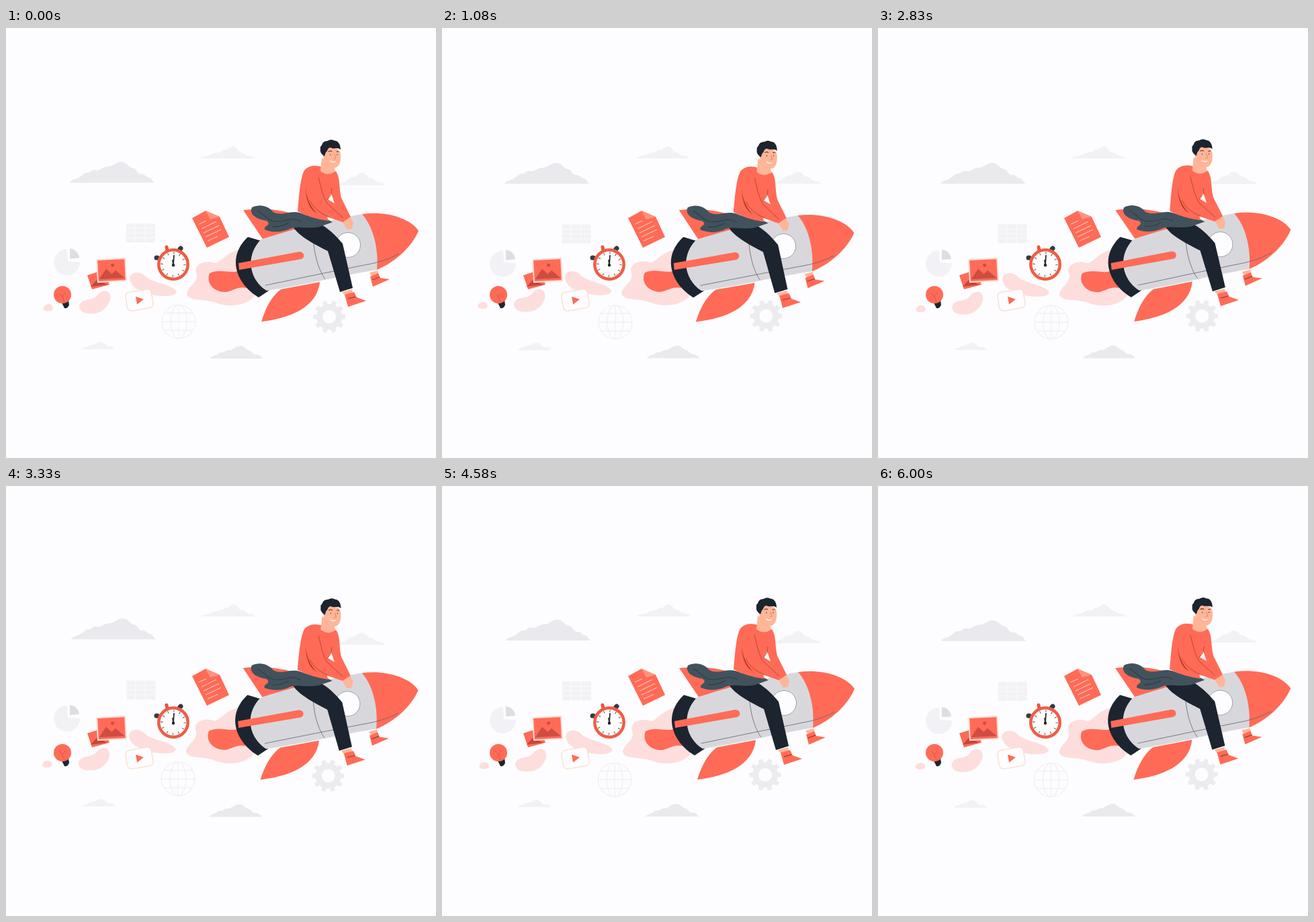
Animation of 640 by 640 pixels, one loop 6.08 s. Source, as an HTML page:

```html
<!DOCTYPE html>
<html lang="en">
<head>
<meta charset="utf-8">
<title>Rocket ride</title>
<style>
  html, body { margin: 0; width: 100%; height: 100%; overflow: hidden; background: #fdfdff; }
  svg { display: block; width: 100vw; height: 100vh; }
  .red { fill: #ff6b57; }
  .dark { fill: #1c2430; }
  .skin { fill: #ffb598; }
  .flame { fill: #fddedd; }
  .cloud { fill: #e9e9ee; }
  .pale { fill: #f2f2f6; }
  .line { fill: none; stroke: #62656d; stroke-width: .8; }
  .seam { fill: none; stroke: #b5432f; stroke-width: .9; }
  .thin { fill: none; stroke: #f0f0f4; stroke-width: 1.2; }
</style>
</head>
<body>
<svg viewBox="0 0 640 640">
  <!-- drifting background -->
  <g data-drift="4 -4"><path class="cloud" d="M95 230C98 224 104 226 109 222C115 219 115 215 121 215C126 216 126 210 133 211C139 213 143 207 151 206C158 207 162 200 171 199C181 199 182 207 188 208C195 208 194 217 201 217C207 216 208 222 213 222C217 223 217 226 221 230Z"/></g>
  <g data-drift="3 0"><path class="pale" d="M290 194C295 189 300 192 306 188C314 184 319 187 324 181C330 183 331 177 338 176C344 177 344 184 350 185C355 185 355 190 361 190Q367 190 370 194Z"/></g>
  <g data-drift="0 5"><path class="pale" d="M495 234C499 229 504 231 508 226C514 221 519 223 524 218C531 213 537 219 540 223C548 223 549 229 556 230Q562 230 564 234Z"/></g>
  <g data-drift="-3 1"><path class="cloud" d="M303 492C307 487 314 488 318 483C324 485 327 478 333 480C339 477 342 474 349 473C355 473 357 479 362 480C366 480 367 487 373 486Q379 487 382 492Z"/></g>
  <g data-drift="1 -3"><path class="pale" d="M113 478C117 473 123 475 127 471C132 472 136 467 141 467C148 467 147 473 153 474Q160 473 162 478Z"/></g>
  <g data-drift="0 -5">
    <path class="pale" d="M91 329A19.500 19.500 0 1 0 110 348L92 347Z"/>
    <path d="M95 328V343L109 342A15 15 0 0 0 95 328Z" fill="#dedee1"/>
  </g>
  <g data-drift="1 -3">
    <path class="pale" d="M179 291H222V319H179Z"/>
    <path d="M179 298H222M179 305H222M179 312H222M192 291V319M207 291V319" stroke="#fbfbfd" fill="none"/>
  </g>
  <g data-drift="-2 -2" class="thin">
    <circle cx="257" cy="437" r="25"/>
    <ellipse cx="257" cy="437" rx="12" ry="25"/>
    <path d="M257 412V462M232 437H282M236 424H278M236 450H278"/>
  </g>
  <g data-drift="-3 3"><path id="gear" fill="#ebebf0" fill-rule="evenodd"/></g>

  <g id="ride">
    <g class="flame">
      <path d="M348 330C331 332 322 346 312 350C296 344 279 352 283 364C288 379 270 384 269 396C272 408 294 402 312 409C333 417 361 413 371 397Z"/>
      <path d="M184 372C186 361 202 362 208 370C220 380 250 382 254 393C250 402 225 399 212 396C196 391 185 385 184 372Z"/>
      <path d="M109 414C112 400 130 408 137 396C146 387 157 391 155 404C151 418 140 426 125 425C114 425 109 420 109 414Z"/>
      <path d="M55 417C58 409 68 409 70 416Q70 421 64 421Q56 422 55 417Z"/>
    </g>
    <path class="red" d="M347 361C336 367 318 357 303 365C297 379 309 394 328 393C340 390 346 384 358 387Z"/>

    <!-- rocket -->
    <path class="red" d="M353 271C376 268 402 269 426 276L431 300L382 314Z"/>
    <path class="red" d="M409 389C394 400 385 420 380 437C422 432 463 416 467 378Z"/>
    <path class="dark" d="M360 311L384 318L391 391L376 401C345 383 326 343 360 311Z"/>
    <path d="M379 315C430 298 480 286 530 277C551 285 557 330 552 360C500 368 444 383 388 391C364 376 354 342 379 315Z" fill="#d8d8dc"/>
    <path class="red" d="M530 277C565 272 602 283 614 302C604 326 579 349 552 360C555 330 547 296 530 277Z"/>
    <path class="line" d="M386 383L473 365L548 350Q571 344 585 336M457 296C456 330 464 359 475 374"/>
    <path class="red" d="M346 350L436 333C444 332 446 342 439 344L347 360Z"/>
    <circle cx="509" cy="323" r="18.500" fill="#fdfdff" stroke="#8c8e96" stroke-width=".8"/>

    <!-- rider -->
    <path class="skin" d="M541 364L553 361L555 367L545 371Z"/>
    <path class="red" d="M542 370L554 365L557 372L571 374L546 385Z"/>
    <path class="dark" d="M428 283L464 290C479 297 491 309 501 321L516 387L497 393L479 332C461 323 436 310 428 297Z"/>
    <path d="M366 267C378 261 391 265 398 274C412 281 424 270 440 276C455 283 470 279 486 289L466 296C445 300 431 293 420 300C406 305 395 304 385 300C384 293 396 294 388 287C374 285 361 278 366 267Z" fill="#42525c"/>
    <path d="M374 272C388 279 389 289 405 288C419 288 425 280 439 288M396 296Q410 296 421 290" fill="none" stroke="#2b3943"/>
    <path class="skin" d="M500 393L515 389L517 397L505 399Z"/>
    <path class="red" d="M504 397L518 393L522 401L536 406L509 415Z"/>
    <path d="M509 403L520 400M545 375L556 371" stroke="#8f3023"/>
    <path class="skin" d="M499 286L512 280L517 290L515 299L508 300Z"/>
    <path class="red" d="M434 273C436 250 438 222 444 212C451 204 463 204 470 207Q479 220 491 213C498 224 495 236 499 253L513 281L501 289L478 281L480 287Q455 284 434 273Z"/>
    <path d="M484 246L489 261L479 255Z" fill="#fdfdff"/>
    <path d="M446 234C446 251 453 267 463 276C453 271 446 259 446 234Z" fill="#b8391f"/>
    <path class="seam" d="M465 222C469 238 472 252 478 261L502 283M485 239L484 248L478 256M452 257Q460 273 480 281"/>
    <path class="skin" d="M470 193L487 203L490 213Q480 222 468 213Z"/>
    <path class="skin" d="M472 184C475 174 497 175 498 188C499 201 495 208 488 208C479 207 471 199 472 184Z"/>
    <path class="dark" d="M474 191C470 188 467 185 468 180C467 176 470 176 471 172C474 167 478 169 481 167C485 165 488 168 491 168C495 169 498 174 498 181C493 177 488 181 483 178C478 178 479 184 476 185Z"/>
    <g fill="none" stroke="#57301d" stroke-linecap="round">
      <path d="M480 184Q483 182 485 184M492 184L495 184M483 188V189M493 188V189"/>
      <path d="M489 188L491 194L488 195" stroke="#e88961"/>
      <path d="M483 198Q486 201 490 199" stroke="#fff" stroke-width="1.200"/>
    </g>
  </g>

  <!-- floating items -->
  <path class="red" d="M277 283L297 272L318 281L332 311L299 327Z"/>
  <path d="M297 272L304 285L318 281Z" fill="#ff937f"/>
  <path d="M287 292L298 287M291 299L313 288M294 305L317 294M297 311L320 300M300 317L315 310" stroke="#ffc3b4" stroke-width="1.200"/>

  <path class="red" d="M121 368L146 360L154 382L128 389Z"/>
  <path d="M126 385L135 375L151 382Z" fill="#c7443a"/>
  <g transform="rotate(-3 157 360)">
    <path d="M136 344H178V377H136Z" fill="#ff6b57" stroke="#fbdcd4" stroke-width="2"/>
    <path d="M138 373L149 358L157 366L163 361L176 373Z" fill="#cf4c40"/>
    <circle cx="159" cy="353" r="2.500" fill="#cf4c40"/>
  </g>

  <path class="dark" d="M83 409L93 405L94 412Q92 418 87 417Z"/>
  <circle class="red" cx="84" cy="397" r="13"/>
  <path d="M80 395L84 400L88 394M84 400L87 408" fill="none" stroke="#e25543"/>

  <g transform="rotate(-10 198 405)">
    <rect x="179" y="391" width="39" height="28" rx="6" fill="#fdfdff" stroke="#fbdcd0" stroke-width="1.300"/>
    <path class="red" d="M194 399L205 405L194 411Z"/>
  </g>

  <g stroke-linecap="round" stroke-width="5">
    <path d="M240 331L239 326" stroke="#e8573f"/>
    <path d="M224 342H225M260 328L259 329" stroke="#333b43" stroke-width="7"/>
    <path d="M228 343L231 345M258 332L257 334" stroke="#e8573f" stroke-width="3"/>
  </g>
  <circle cx="249" cy="352" r="21.700" fill="#fffdfc" stroke="#ee5d46" stroke-width="4.500"/>
  <circle cx="249" cy="352" r="17" fill="none" stroke="#55555c" stroke-width="3.500" stroke-dasharray="1 7.901"/>
  <path d="M249 353L250 338M249 353L248 345" stroke="#2c2c30" stroke-width="1.800"/>
  <circle cx="249" cy="353" r="2.200" class="dark"/>
</svg>
<script>
  const LOOP = 6080;
  const ride = document.getElementById('ride');
  const drifters = [...document.querySelectorAll('[data-drift]')].map(el => ({
    el, move: el.dataset.drift.split(' ').map(Number)
  }));

  function gearPath(cx, cy, teeth) {
    const points = [];
    for (let i = 0; i < teeth; i++) {
      for (const [turn, radius] of [[-.3, 19], [-.2, 24], [.2, 24], [.3, 19]]) {
        const a = (i + turn) / teeth * 2 * Math.PI;
        points.push(`${cx + radius * Math.cos(a)} ${cy + radius * Math.sin(a)}`);
      }
    }
    return `M${points.join('L')}ZM${cx - 10} ${cy}a10 10 0 1 0 20 0a10 10 0 1 0 -20 0Z`;
  }
  document.getElementById('gear').setAttribute('d', gearPath(481, 430, 10));

  // swings between -.5 and .5, highest at the given time
  const swing = (t, peak, period) => .5 * Math.cos((t - peak) / period * 2 * Math.PI);

  function draw() {
    const t = performance.now() % LOOP;
    const tilt = -1.6 * swing(t, 2300, LOOP / 2);
    ride.setAttribute('transform', `rotate(${tilt} 355 245)`);
    const drift = swing(t, 1930, LOOP / 4);
    for (const { el, move: [x, y] } of drifters) {
      el.setAttribute('transform', `translate(${x * drift} ${y * drift})`);
    }
    requestAnimationFrame(draw);
  }
  draw();
</script>
</body>
</html>
```
